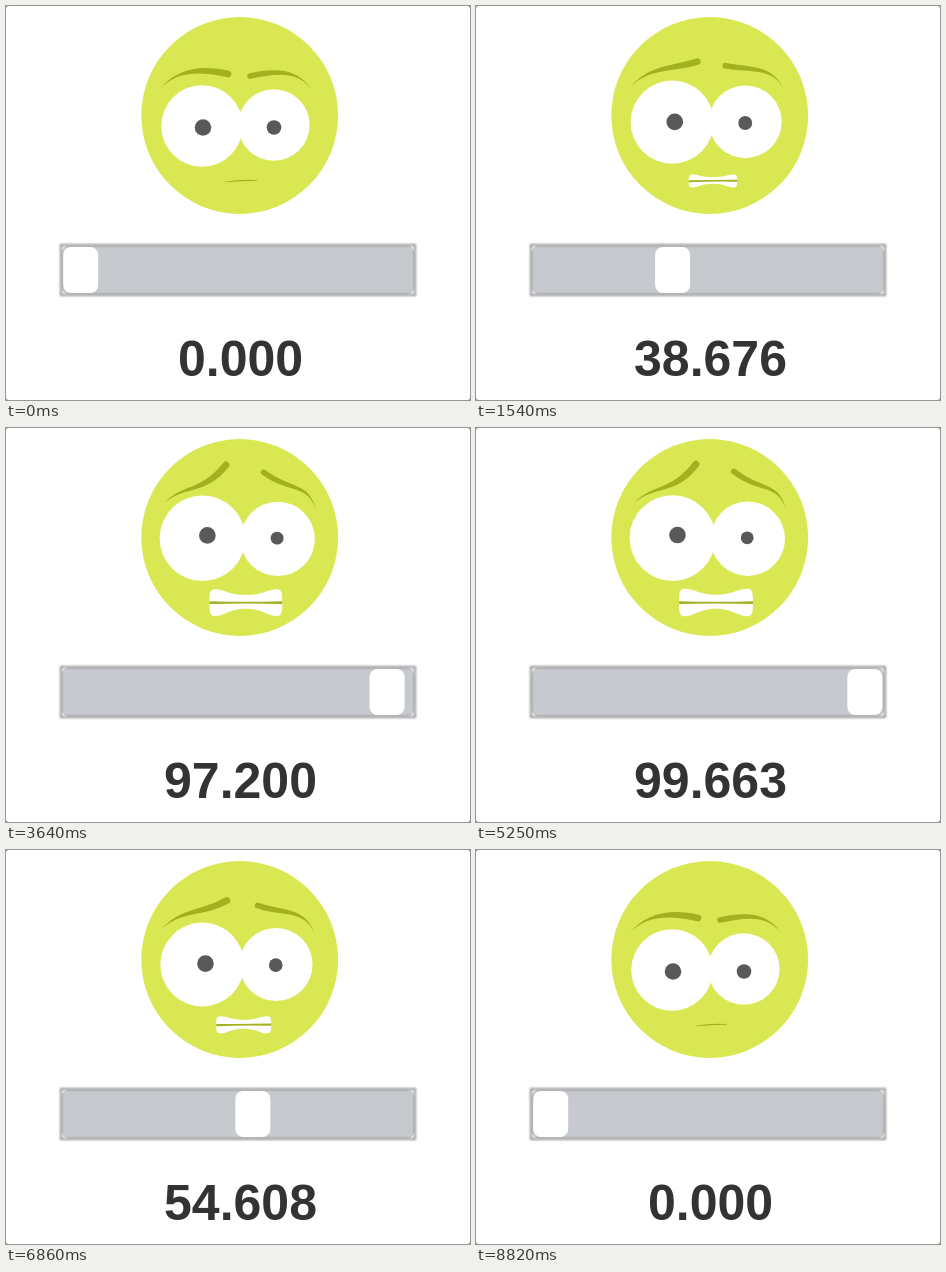
Write an HTML page that moves like this. It is 464 by 394 pixels and loops after 9.24 s.

```html
<!DOCTYPE html>
<html lang="en">
<head>
<meta charset="utf-8">
<title>Worry slider</title>
<style>
  html, body { margin: 0; width: 100%; height: 100%; overflow: hidden; background: #fff; }
  svg { display: block; width: 464px; height: 394px; }
  text { font: bold 50px "Liberation Sans", Arial, sans-serif; fill: #333; text-anchor: middle; }
</style>
</head>
<body>
<svg viewBox="0 0 464 394">
  <defs>
    <filter id="soft" x="-5%" y="-20%" width="110%" height="140%">
      <feGaussianBlur stdDeviation=".9"/>
    </filter>
  </defs>
  <rect width="464" height="394" fill="#999"/>
  <rect width="464" height="394" rx="3" fill="#fff"/>

  <circle cx="233.7" cy="109.5" r="98.4" fill="#d9e852"/>
  <g fill="#fff">
    <circle id="eyeL"/>
    <circle id="eyeR"/>
    <path id="teeth"/>
  </g>
  <g fill="#58595b">
    <circle id="pupilL"/>
    <circle id="pupilR"/>
  </g>
  <g fill="#a3b020">
    <path id="browL"/>
    <path id="browR"/>
    <path id="lips"/>
  </g>

  <rect x="55" y="239" width="354" height="50" fill="#fff"/>
  <rect x="55.5" y="239.5" width="353" height="49" rx="8" fill="#c6c9ce"/>
  <rect x="55" y="239" width="354" height="50" fill="none" stroke="#888" stroke-width="1.8" filter="url(#soft)"/>
  <rect id="knob" y="241" width="35" height="46" rx="8" fill="#fff"/>
  <text id="count" x="234.5" y="369.7"></text>
</svg>
<script>
const LOOP = 9240, STEP = 70;
const STALLS = [1610, 7350]; // steps where the knob hesitates
const KEYS = [ // [ms, slider value]
  [280, 0], [1540, 38.676], [2800, 73.512], [3920, 100],
  [5180, 100], [5250, 99.663], [6860, 54.608], [8050, 18.204], [8820, 0]
];

const $ = id => document.getElementById(id);
const lerp = (a, b, k) => a + (b - a) * k;
const set = (id, attrs) => {
  for (const name in attrs) $(id).setAttribute(name, attrs[name]);
};

// Monotone cubic through the points, level wherever they are flat or turn
function curve(pts, t) {
  const last = pts.length - 1;
  if (t <= pts[0][0]) return pts[0][1];
  if (t >= pts[last][0]) return pts[last][1];
  const slope = i => (pts[i + 1][1] - pts[i][1]) / (pts[i + 1][0] - pts[i][0]);
  const tangent = i => {
    if (i === 0 || i === last) return 0;
    const a = slope(i - 1), b = slope(i);
    return a * b > 0 ? 2 * a * b / (a + b) : 0;
  };
  const i = pts.findIndex(p => p[0] > t) - 1;
  const [t0, v0] = pts[i], [t1, v1] = pts[i + 1];
  const h = t1 - t0, s = (t - t0) / h, r = 1 - s;
  return v0 * (1 + 2 * s) * r * r + h * tangent(i) * s * r * r
       + v1 * s * s * (3 - 2 * s) - h * tangent(i + 1) * s * s * r;
}

function valueAt(ms) {
  const t = Math.floor((ms % LOOP) / STEP) * STEP;
  return curve(KEYS, STALLS.includes(t) ? t - STEP : t);
}

const circle = (id, cx, cy, r) => set(id, { cx, cy, r });

// Tapered stroke from a sharp tip along a cubic to a round end
function brow(id, k, width, calm, worried) {
  const spine = calm.map((p, i) => p.map((n, j) => lerp(n, worried[i][j], k)));
  const [tip, a, b, end] = spine;
  const dx = end[0] - b[0], dy = end[1] - b[1], len = Math.hypot(dx, dy);
  const side = ([x, y], w) => `${x + dy / len * w} ${y - dx / len * w}`;
  const turn = dx > 0 ? 1 : -1, w = width * turn;
  set(id, {
    d: `M${tip.join(" ")}C${side(a, w * .4)} ${side(b, w)} ${side(end, w)}` +
       `A${width} ${width} 0 0 ${dx > 0 ? 1 : 0} ${side(end, -w)}` +
       `C${side(b, -w)} ${side(a, -w * .4)} ${tip.join(" ")}Z`
  });
}

function mouth(k) {
  const x = lerp(235, 240, k), y = lerp(175.2, 174.6, k);
  const w = lerp(16, 37, k), h = 13.8 * k ** .8;
  const p = (dx, dy) => `${x + dx * w} ${y + dy * h}`;
  // one row of teeth: up the side, round the corner, dip in the middle
  const row = (s, dip) =>
    `C${p(-s, -s * .6)} ${p(-s, -s)} ${p(-s * .86, -s)}` +
    `C${p(-s * .6, -s)} ${p(-s * .45, -s * dip)} ${p(0, -s * dip)}` +
    `S${p(s * .6, -s)} ${p(s * .86, -s)}` +
    `C${p(s, -s)} ${p(s, -s * .6)} ${p(s, 0)}`;
  set("teeth", { d: `M${p(-1, 0)}${row(1, .57)}${row(-1, .45)}Z` });

  const edge = lerp(.3, 1.4, Math.sqrt(k)), bend = 1.6 - edge;
  const tilt = .8 * (1 - k) ** 2, l = x - w, r = x + w;
  set("lips", {
    d: `M${l} ${y + tilt - edge}Q${x} ${y - bend - tilt} ${r} ${y - tilt - edge}` +
       `V${y - tilt + edge}Q${x} ${y + bend - 2 * tilt} ${l} ${y + tilt + edge}Z`
  });
}

function draw(value) {
  const k = value / 100;
  circle("eyeL", 196 + .5 * k, 120 - 10 * k, 40.8 + 2.1 * k);
  circle("eyeR", 267.8 + 4 * k, 119 - 8.3 * k, 35.8 + 1.4 * k);
  circle("pupilL", 197 + 4.5 * k, 121.5 - 14.5 * k, 8.3);
  circle("pupilR", 268 + 3.2 * k, 121.5 - 11.7 * k, 7.3 - .9 * k);
  brow("browL", k, 3.4,
    [[152, 85], [170, 63], [195, 62], [222, 68]],
    [[158, 75], [178, 56], [197, 66], [220, 36]]);
  brow("browR", k, 2.9,
    [[308, 88], [294, 62], [270, 65], [244, 70]],
    [[310, 82], [303, 54], [284, 64], [258, 43.5]]);
  mouth(k);
  set("knob", { x: 57.2 + 3.152 * value });
  $("count").textContent = value.toFixed(3);
}

const start = performance.now();
function tick() {
  draw(valueAt(performance.now() - start));
  requestAnimationFrame(tick);
}
tick();
</script>
</body>
</html>
```
